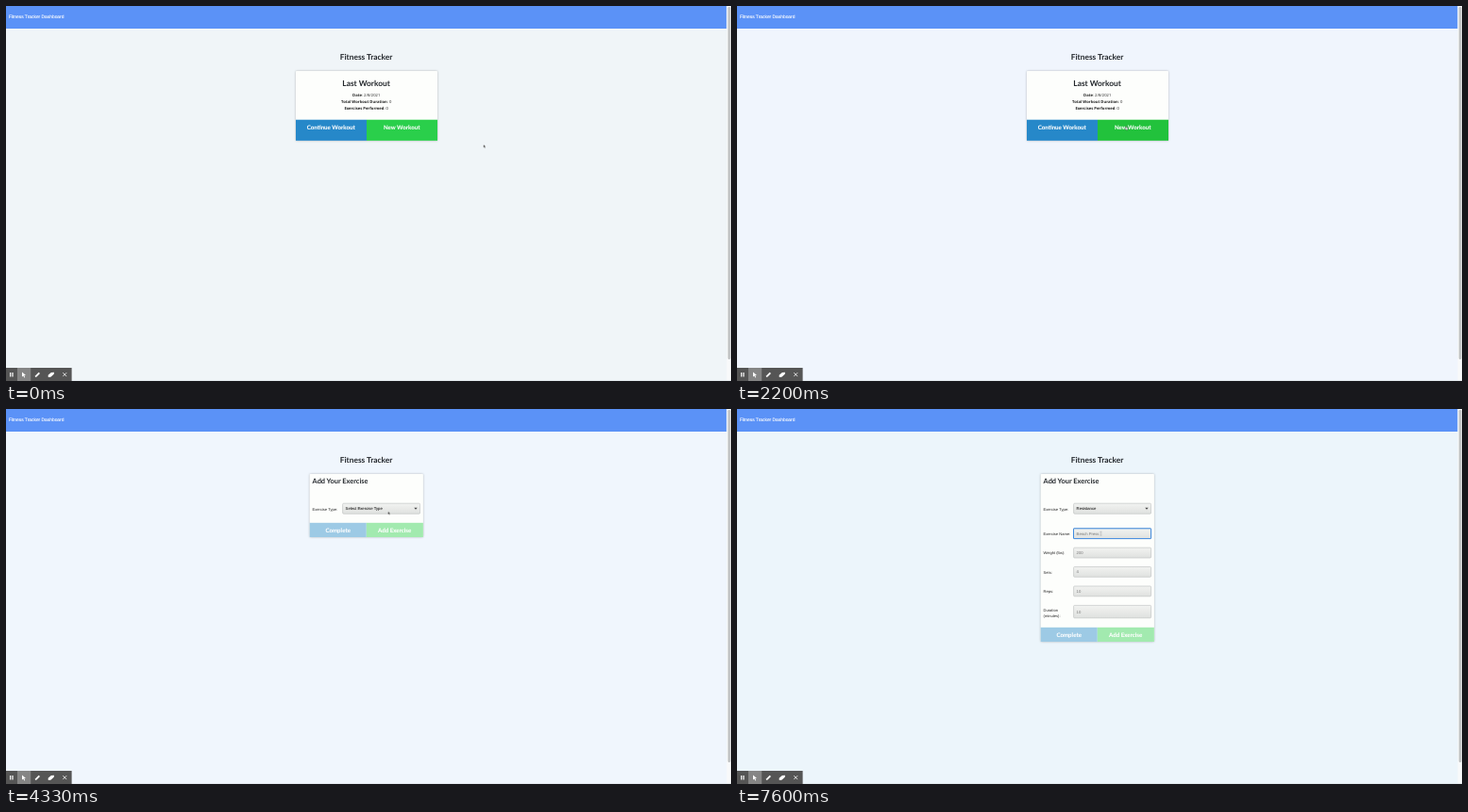
Animation of 768x398 px, one loop 8 s. Source, as an HTML page:

```html
<!DOCTYPE html>
<html lang="en">
<head>
<meta charset="utf-8">
<title>Fitness Tracker</title>
<style>
html, body { margin: 0; width: 100%; height: 100%; overflow: hidden; background: #f0f6fd; }
svg { display: block; width: 100%; height: 100%; }
text { text-rendering: geometricPrecision; white-space: pre; }

.title { font: 700 8.4px Lato, sans-serif; fill: #22262b; }
.mid { text-anchor: middle; }
.sub { font-size: 7.4px; }
.button { font: 700 6.16px Lato, sans-serif; fill: #fff; stroke: #fff; stroke-width: .1; text-anchor: middle; }
.brand { font: 4.88px "Liberation Sans", Arial, sans-serif; fill: #fff; stroke: #fff; stroke-width: .12; }
.stat { font: 4.15px "Open Sans", sans-serif; fill: #222; text-anchor: middle; }
.stat tspan { font-weight: 700; }
.label { font: 4.06px "Liberation Sans", Arial, sans-serif; fill: #222; }
.value { font: 4.22px "Liberation Sans", Arial, sans-serif; fill: #1d1d1d; stroke: #1d1d1d; stroke-width: .06; }
.hint { fill: #737373; stroke: none; }
.field { fill: url(#field); stroke: #b9bcbc; stroke-width: .6; }
.ring { fill: none; stroke: #3f8be0; stroke-width: 1; }
.card { fill: #fdfefc; }
.shadow { filter: drop-shadow(0 .3px .8px #0004); }

/* Everything runs on one 8 s clock. */
.cut { animation: 8s step-end infinite; }
.page { animation-name: page; }
.home { animation-name: home; }
.form { animation-name: form; }
.fonts { animation-name: fonts; }
.sheet { animation-name: sheet; }
.foot { animation-name: foot; }
.details { animation-name: details; }
.unset { animation-name: unset-type; }
.select-ring { animation-name: select-ring; }
.name-ring { animation-name: name-ring; }
.arrow { animation-name: arrow; }
.hand { animation-name: hand; }
.beam { animation-name: beam; }
.blue { animation: blue 8s linear infinite; }
.green { animation: green 8s linear infinite; }
.pointer { animation: pointer 8s linear infinite; }

@keyframes page { 0% { fill: #f0f5f8 } .75% { fill: #f0f5fd } 43.25% { fill: #eef4fc } 47.5% { fill: #f0f6fd } 80% { fill: #ecf5fb } }
@keyframes home { 0% { visibility: visible } 43.25%, to { visibility: hidden } }
@keyframes form { 0% { visibility: hidden } 43.25%, to { visibility: visible } }
@keyframes fonts { 0% { visibility: hidden } 47.5%, to { visibility: visible } }
@keyframes sheet {
  0% { height: 67px; filter: none }
  47.5% { height: 67px; filter: drop-shadow(0 .3px .8px #0004) }
  76.625%, to { height: 178px; filter: drop-shadow(0 .3px .8px #0004) }
}
@keyframes foot { 0% { transform: none } 76.625%, to { transform: translateY(111px) } }
@keyframes details { 0% { visibility: hidden } 76.625%, to { visibility: visible } }
@keyframes unset-type { 0% { visibility: hidden } 43.25% { visibility: visible } 76.625%, to { visibility: hidden } }
@keyframes select-ring { 0% { visibility: hidden } 60.75% { visibility: visible } 91.625%, to { visibility: hidden } }
@keyframes name-ring { 0% { visibility: hidden } 91.625%, to { visibility: visible } }
@keyframes arrow { 0% { visibility: visible } 8.4% { visibility: hidden } 43.25% { visibility: visible } 89%, to { visibility: hidden } }
@keyframes hand { 0% { visibility: hidden } 8.4% { visibility: visible } 43.25%, to { visibility: hidden } }
@keyframes beam { 0% { visibility: hidden } 89%, to { visibility: visible } }
@keyframes blue { 0%, 8.4% { fill: #2688c9 } 9.6%, 18.5% { fill: #1e7bbd } 19.7%, to { fill: #2688c9 } }
@keyframes green { 0%, 18.5% { fill: #2acf4b } 19.7%, to { fill: #22c23c } }
@keyframes pointer {
  0%, .75% { transform: translate(505.8px, 147.2px) }
  3% { transform: translate(487px, 158px) }
  5.5% { transform: translate(438px, 161px) }
  7.6% { transform: translate(393px, 149px) }
  10%, 11.6% { transform: translate(366.4px, 135px) }
  16% { transform: translate(368px, 134px) }
  18.5% { transform: translate(381px, 132px) }
  21.6%, 22.5% { transform: translate(410px, 129px) }
  25.75%, 37.5% { transform: translate(412px, 127.6px) }
  43.25%, 45.75% { transform: translate(417.8px, 126.5px) }
  53.25%, 54% { transform: translate(405px, 109px) }
  55.75%, 61.6% { transform: translate(400.4px, 106.6px) }
  76.6%, 77.5% { transform: translate(389.6px, 110.4px) }
  80% { transform: translate(389.6px, 112px) }
  89%, to { transform: translate(385.4px, 130px) }
}
</style>
</head>
<body>
<svg viewBox="0 0 768 398" preserveAspectRatio="none">
  <defs>
    <linearGradient id="field" x2="0" y2="1">
      <stop stop-color="#f2f3f1"/><stop offset="1" stop-color="#dfe1df"/>
    </linearGradient>
  </defs>

  <rect class="cut page" width="768" height="398" fill="#f0f5fd"/>
  <rect width="763.5" height="24" fill="#5b92f7"/>
  <text class="brand" x="2.9" y="12.6">Fitness Tracker Dashboard</text>

  <g class="cut home">
    <text class="title mid" x="381.6" y="56.5">Fitness Tracker</text>
    <g class="shadow">
      <rect class="card" x="307" y="69" width="150" height="74" rx=".8"/>
      <rect class="blue" x="307" y="120.7" width="75" height="22.2"/>
      <rect class="green" x="382" y="120.7" width="75" height="22.2"/>
    </g>
    <text class="title mid" x="381.6" y="85.2">Last Workout</text>
    <text class="stat" x="381.7" y="96"><tspan>Date</tspan>: 2/8/2021</text>
    <text class="stat" x="381.7" y="103.2"><tspan>Total Workout Duration</tspan>: 0</text>
    <text class="stat" x="381.7" y="110.4"><tspan>Exercises Performed</tspan>: 0</text>
    <text class="button" x="344.2" y="130.5">Continue Workout</text>
    <text class="button" x="419.2" y="130.5">New Workout</text>
  </g>

  <g class="cut form">
    <rect class="cut sheet card" x="321.7" y="69" width="120.2" height="67" rx=".8"/>
    <text class="label" x="324.6" y="107.5">Exercise Type:</text>
    <rect class="field" x="356.6" y="100.2" width="82" height="11" rx="1.2"/>
    <path d="M432.3 104.8h3.4l-1.7 2z" fill="#444"/>
  </g>
  <text class="cut unset value" x="359.6" y="107.4">Select Exercise Type</text>

  <g class="cut fonts">
    <text class="title mid" x="381.6" y="56.5">Fitness Tracker</text>
    <text class="title sub" x="324.6" y="79.2">Add Your Exercise</text>
    <g class="cut foot">
      <rect x="321.7" y="120.8" width="60.1" height="15.2" fill="#9dcae5"/>
      <rect x="381.8" y="120.8" width="60.1" height="15.2" fill="#a2eaaf"/>
      <text class="button" x="351.7" y="130.5">Complete</text>
      <text class="button" x="411.7" y="130.5">Add Exercise</text>
    </g>
  </g>

  <g class="cut details" id="details">
    <text class="value" x="359.6" y="107.4">Resistance</text>
  </g>
  <rect class="cut select-ring ring" x="356.4" y="100" width="82.4" height="11.4" rx="1.2"/>
  <rect class="cut name-ring ring" x="356.5" y="126.8" width="82.1" height="10.8" rx=".4"/>

  <rect x="763.5" width="4.5" height="398" fill="#f8f9fa"/>
  <rect x="764.7" y="1" width="2.7" height="374" rx="1.3" fill="#c1c3c4"/>
  <rect y="397.3" width="768" height=".7" fill="#dfe4e8"/>

  <g>
    <rect y="384" width="69.6" height="14" fill="#555"/>
    <rect x="12" y="384" width="14.2" height="14" fill="#858585"/>
    <g fill="#fff">
      <path d="M4.1 389h1.2v4.6H4.1zM6.4 389h1.2v4.6H6.4z"/>
      <path d="M17 388.5l4 3.4-1.8.2 1 2-.9.4-.9-2-1.4 1.1z"/>
      <path d="M30.8 394l.4-1.7 3.5-3.5 1.3 1.3-3.5 3.5z"/>
      <path d="M44.6 391.8l3.2-2.7 3.2-.3-.3 2-3.3 2.9-2.6.3z"/>
    </g>
    <path d="M60.3 389.2l3.9 3.9m0-3.9l-3.9 3.9" stroke="#fff" stroke-width=".8"/>
  </g>

  <g class="pointer">
    <path class="cut arrow" d="M0 0v3l.7-.6.5 1.1.6-.2-.5-1.1h1z" fill="#111" stroke="#fff" stroke-width=".25"/>
    <path class="cut hand" d="M-.1 0h.6v1.2l1.7.4v1.2l-.5 1H.1L-1 2.2l.4-.3.5.4z" fill="#fff" stroke="#222" stroke-width=".4"/>
    <path class="cut beam" d="M-.5 0h1M0 0v4.3m-.5 0h1" stroke="#666" stroke-width=".35"/>
  </g>
</svg>
<script>
const details = document.getElementById('details');

function add(tag, attrs, text = '') {
  const node = document.createElementNS('http://www.w3.org/2000/svg', tag);
  for (const key in attrs) node.setAttribute(key, attrs[key]);
  node.textContent = text;
  details.append(node);
}

// label lines, placeholder, field centre, field height
const fields = [
  [['Exercise Name:'], 'Bench Press', 132.1, 10.8],
  [['Weight (lbs):'], '200', 152.6, 10.8],
  [['Sets:'], '4', 172.9, 10.8],
  [['Reps:'], '10', 193.4, 10.8],
  [['Duration', '(minutes):'], '10', 215.1, 13.4],
];
for (const [lines, hint, y, height] of fields) {
  add('rect', { class: 'field', x: 356.6, y: y - height / 2, width: 82, height, rx: 1 });
  add('text', { class: 'value hint', x: 359.6, y: y + 1.5 }, hint);
  const top = y + 1.6 - (lines.length - 1) * 1.4;
  lines.forEach((line, i) => add('text', { class: 'label', x: 324.6, y: top + i * 5.7 }, line));
}
</script>
</body>
</html>
```
